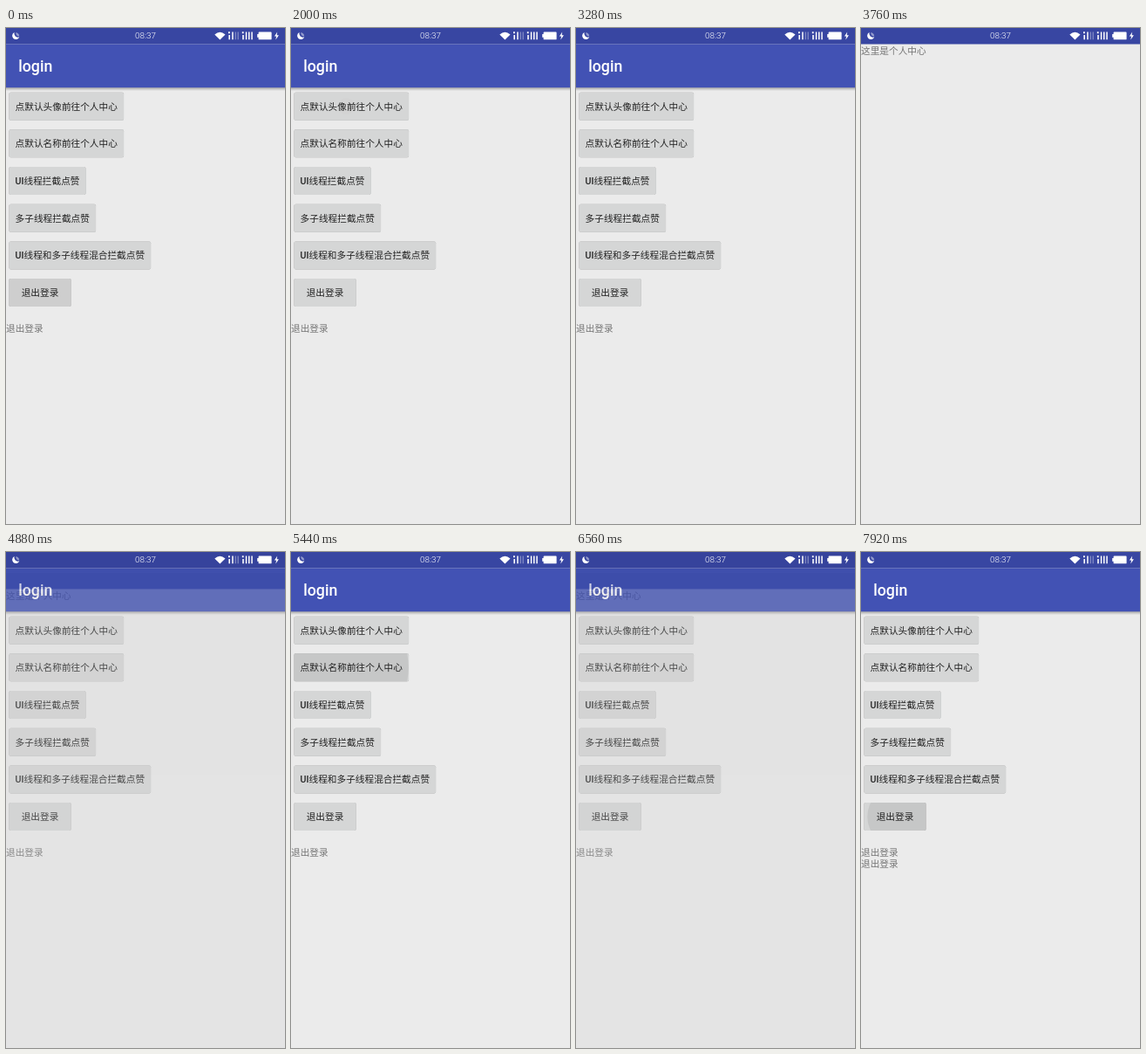
These frames come from a looping animation (320x568 px, 8000 ms). An HTML page:

```html
<!DOCTYPE html>
<html lang="zh-CN">
<head>
<meta charset="utf-8">
<title>login</title>
<style>
  html, body { margin: 0; width: 100%; height: 100%; overflow: hidden; background: #000; }
  svg { display: block; }
  text { font: 10.67px Roboto, "Noto Sans CJK SC", "Noto Sans CJK", sans-serif; fill: #757575; }
  .label { font-weight: 500; fill: #222; }
  .title { font-size: 17.78px; font-weight: 500; fill: #fff; }
  .clock { font-size: 9.8px; font-weight: 300; fill: #fff; text-anchor: middle; }
  .face { fill: #d5d6d6; filter: drop-shadow(0 .8px .7px rgba(0, 0, 0, .32)); }
  .icons { fill: #fff; }
</style>
</head>
<body>
<svg id="stage" width="100%" height="100%" viewBox="0 0 320 568">
  <defs>
    <linearGradient id="shade" x2="0" y2="1">
      <stop stop-opacity=".3"/><stop offset="1" stop-opacity="0"/>
    </linearGradient>
  </defs>
  <rect width="320" height="568"/>
  <g id="main"></g>
  <g id="login"></g>
  <g id="center"></g>
  <g class="icons">
    <path d="M9.6 5A4.2 4.2 0 1 0 15.3 10.2A4.2 4.2 0 0 1 9.6 5Z"/>
    <path d="M11.2 5.2A4 4 0 0 1 15.2 9.4A4 4 0 0 1 11.2 5.2Z" opacity=".45"/>
    <text class="clock" x="160" y="12.3">08:37</text>
    <path d="M239.3 7.4Q245.4 2.2 251.5 7.4L245.4 13.4Z"/>
    <path d="M255 4.3h1.8v2H255zM255.4 8h1.6v5.3h-1.6zM259.2 4.5h1.5v8.8h-1.5z"/>
    <path d="M262.6 4.5h1.4v8.8h-1.4zM265.5 4.5h1.4v8.8h-1.4z" opacity=".35"/>
    <path d="M270.8 4.3h1.8v2h-1.8zM271.2 8h1.6v5.3h-1.6zM274.8 4.5h1.5v8.8h-1.5zM278 4.5h1.5v8.8H278zM281.3 4.5h1.5v8.8h-1.5z"/>
    <path d="M290.5 4.5h13.2q.9 0 .9.9v7q0 .9-.9.9h-13.2q-.9 0-.9-.9v-1.6h-1.4v-3.8h1.4V5.4q0-.9.9-.9z"/>
    <path d="M311.2 4.6L307.9 9.5h2.2l-.8 4L312.9 8.3h-2.3z"/>
  </g>
</svg>
<script>
const LOOP = 8000, STEP = 80, SHIFT = 45.4;
const EM = 10.67, PITCH = 42.67;
const $ = id => document.getElementById(id);
const clamp = v => Math.min(1, Math.max(0, v));
const easeOut = (v, power) => 1 - (1 - clamp(v)) ** power;

const windowBase = `<rect width="320" height="568" fill="#ebebeb"/>
  <rect width="320" height="18.5" fill="#3846a2"/>`;

function button(id, label, top, textWidth) {
  const width = Math.max(71.1, textWidth + 14.2);
  const x = 3.5 + (width - textWidth) / 2;
  return `<rect class="face" x="3.5" y="${top}" width="${width}" height="32" rx="1.8"/>
    <svg x="3.5" y="${top}" width="${width}" height="32"><circle id="${id}" r="0"/></svg>
    <text class="label" x="${x}" y="${top + 20.1}">${label}</text>`;
}

const labels = [
  ["点默认头像前往个人中心", 11 * EM],
  ["点默认名称前往个人中心", 11 * EM],
  ["UI线程拦截点赞", 73.7],
  ["多子线程拦截点赞", 8 * EM],
  ["UI线程和多子线程混合拦截点赞", 148.4],
  ["退出登录", 4 * EM]
];

$("main").innerHTML = windowBase +
  `<rect y="68" width="320" height="4" fill="url(#shade)"/>
   <rect y="18.5" width="320" height="49.7" fill="#4252b4"/>
   <text class="title" x="14.2" y="50.2">login</text>` +
  labels.map(([label, width], i) => button("ripple" + i, label, 73.7 + i * PITCH, width)).join("") +
  `<text x="0" y="348.3">退出登录</text>
   <text x="0" y="360.8" id="secondLine">退出登录</text>`;
$("login").innerHTML = windowBase + button("rippleLogin", "LOGIN", 24, 31);
$("center").innerHTML = windowBase + `<text x="0" y="30.1">这里是个人中心</text>`;

// [page, open start, close start]
const visits = [
  ["login", 2200, 2960],
  ["center", 3320, 4660],
  ["center", 5480, 6340]
];

// [ripple, press start, x, y within the button]
const presses = [
  ["ripple5", -300, 39, 16],
  ["ripple0", 1985, 60, 16],
  ["rippleLogin", 2790, 36, 16],
  ["ripple1", 5265, 60, 16],
  ["ripple5", 7800, 39, 16]
];

function place(id, y, alpha) {
  const page = $(id);
  page.setAttribute("transform", `translate(0 ${y})`);
  page.setAttribute("opacity", alpha);
}

function drawPages(t) {
  let mainAlpha = 1;
  place("login", 0, 0);
  place("center", 0, 0);
  for (const [page, open, close] of visits) {
    if (t < open || t > close + 250) continue;
    if (t < close) {
      const age = t - open;
      place(page, SHIFT * (1 - easeOut(age / 350, 5)), easeOut(age / 200, 3));
      mainAlpha = 1 - .3 * easeOut(age / 217, 2);
    } else {
      const age = t - close;
      place(page, SHIFT * (age / 250) ** 5, 1 - clamp((age - 100) / 150));
      mainAlpha = .7 + .3 * age / 250;
    }
  }
  $("main").setAttribute("opacity", mainAlpha);
}

function drawRipples(t) {
  for (const [id] of presses) $(id).setAttribute("r", 0);
  for (const [id, start, x, y] of presses) {
    const age = t - start;
    if (age < 0 || age > 400) continue;
    const ripple = $(id);
    const alpha = .07 * clamp(age / 100) * (1 - clamp((age - 200) / 200));
    ripple.setAttribute("cx", x);
    ripple.setAttribute("cy", y);
    ripple.setAttribute("r", (id === "ripple0" || id === "ripple1" ? 75 : 45) * easeOut(age / 225, 2));
    ripple.setAttribute("opacity", alpha);
  }
}

function render(now) {
  const t = Math.floor((now % LOOP) / STEP) * STEP;
  drawPages(t);
  drawRipples(t);
  $("secondLine").setAttribute("opacity", t >= 7920 ? 1 : 0);
}

const began = performance.now();
function tick() {
  render(performance.now() - began);
  requestAnimationFrame(tick);
}
tick();
</script>
</body>
</html>
```
